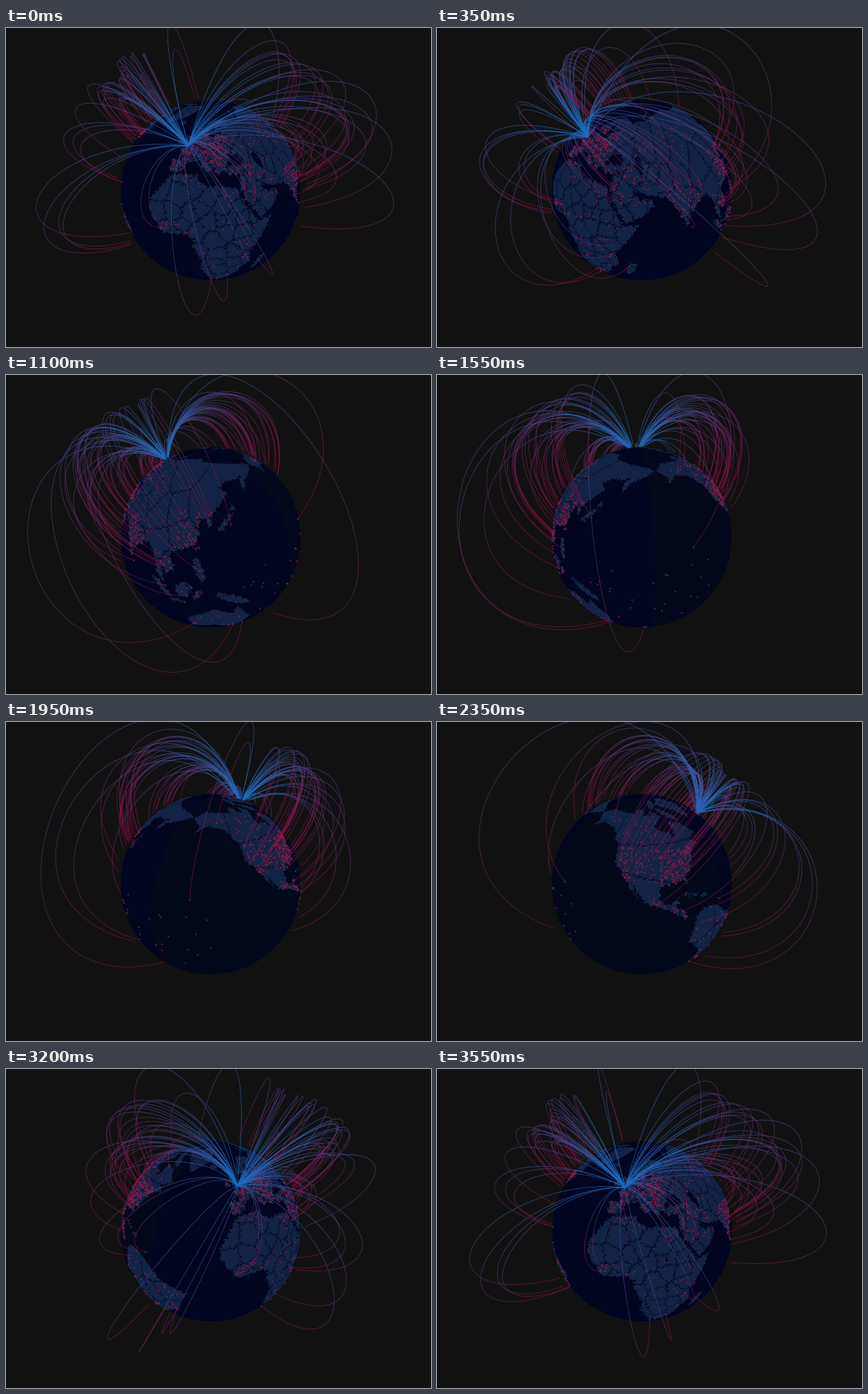
A matplotlib script for the animation above (3.6 s loop, 600 px wide and 450 px high).

```python
import numpy as np
import matplotlib.pyplot as plt
from matplotlib.animation import FuncAnimation
from matplotlib.collections import LineCollection
from matplotlib.path import Path

W, H = 600, 450
FRAMES, STEP_MS = 72, 50
CX, CY, RADIUS = 289, 229, 127
DIST = 3.7                      # camera distance in globe radii
TILT = np.radians(29.5)
START_LON = 18
FOCAL = RADIUS * np.sqrt(DIST ** 2 - 1)
HOME = (-0.3, 51.4)
CELL = 0.5                      # map resolution in degrees

BACK, DOT = "#111111", "#7d1c40"
OCEAN, OCEAN_DIM, LAND, BORDER = (2, 5, 31), (4, 8, 27), (18, 35, 69), (7, 14, 42)
ARC_A, ARC_B = np.array([24, 112, 192]) / 255, np.array([152, 12, 66]) / 255

# Coastlines as lon, lat, lon, lat ...
AFRICA = [-17, 21, -17, 15, -8, 4.5, 4, 6, 9.5, 4, 9, -1, 13.5, -11, 12, -17, 18.3, -34,
          26, -34, 33, -26, 35, -20, 40.5, -15, 39, -7, 47, 4.5, 51.3, 11.8, 43.3, 11.5,
          37, 21, 32.5, 30, 20, 32, 19, 30.3, 10.5, 34, 10.5, 37, -6, 35.8, -9.8, 31]
EUROPE = [-9, 37, -9, 43, -1.8, 43.5, -1.2, 46, -4.7, 48.4, 4, 52, 8.5, 54, 9, 57.5,
          11, 54.5, 19, 54.5, 23, 59, 30, 60, 22, 61, 22, 65.5, 17.5, 62, 15, 55.5,
          11, 59, 7, 58, 5, 61, 12, 66, 19, 69.5, 27, 71, 41, 67, 40, 65, 46, 68,
          62, 69, 62, 41, 42, 41, 38, 45.5, 39, 47, 31, 46.5, 28, 41, 24, 38, 22, 37,
          14, 45.5, 18, 40, 15.5, 38, 10, 44, 3, 43, -2, 36.8]
ASIA = [60, 69, 70, 73, 104, 77.5, 113, 74, 140, 72.5, 180, 69, 190, 66, 179, 62.5,
        163, 58, 157, 51, 156, 57, 163, 62, 155, 59.3, 142, 59, 135, 54.7, 141, 52,
        132, 43, 127.5, 39.5, 129, 35.5, 126.4, 34.5, 126, 38, 119, 39, 122, 37,
        119.5, 35, 122, 31, 118.5, 24.5, 108, 21.5, 105.8, 19, 109.2, 12, 105, 9,
        101, 13, 103.5, 2, 98.5, 8, 97, 16, 91.5, 22.5, 87, 21, 80, 15, 77.5, 8,
        73, 18, 67, 25, 57, 26.8, 48.5, 30, 51.5, 24.5, 56.3, 26, 59.8, 22.5, 55, 17.5,
        45, 12.8, 39, 21, 35, 28, 36, 36.6, 27.5, 37, 27, 40.5, 41, 41.5, 60, 42]
N_AMERICA = [-168, 66, -156, 71, -128, 70, -95, 68, -94, 72, -82, 67.5, -94, 60, -92, 57,
             -82, 55, -79, 51.5, -77, 56, -78, 62, -65, 60, -56, 52, -66, 49, -61, 46,
             -70, 43, -75.6, 35.2, -81, 31, -80, 26, -83, 29.7, -97, 28, -97.6, 22,
             -95, 18.5, -91, 18.6, -87, 21.4, -88.5, 16, -83.5, 14, -83, 10, -77.5, 8,
             -85, 10, -94, 16.2, -105, 20, -113, 31, -109.7, 23, -117, 32.5, -124.3, 40,
             -124.5, 48, -134, 58, -150, 60.5, -163, 55, -158, 59]
S_AMERICA = [-77.5, 8.5, -72, 12, -62, 10.5, -50, 0, -35, -6, -39, -13, -41, -22,
             -48.5, -26, -57, -38, -65.5, -45, -69, -54, -74, -52, -71.5, -30,
             -70.3, -18.5, -81.2, -5, -77.5, 4]
AUSTRALIA = [114, -22, 130, -12, 136, -15, 140.5, -17.5, 142.5, -10.8, 153, -25,
             150, -37.5, 140, -38, 131, -31.5, 115.5, -34.5]
GREENLAND = [-73, 78, -30, 83.5, -12, 81.5, -22, 70.5, -43.5, 60, -54, 70]

# Islands: lon, lat, half length, half width, slope in degrees.
ISLANDS = [(-2, 53.5, 4.8, 2, 110), (-8, 53, 2, 1.8, 0), (-19, 65, 4.5, 1.5, 0),
           (137, 36.5, 6.5, 1.3, 40), (143, 43.5, 2, 1.3, 0), (47, -19, 7, 2.1, 70),
           (114, 1, 5, 4, 50), (101, 0, 7.5, 1.7, 315), (110, -7.3, 4.5, .8, 350),
           (121, -1.5, 3.5, 1.5, 60), (140, -5, 10, 2.3, 335), (122, 13, 7, 2, 290),
           (175.5, -39, 3.5, 1.7, 300), (170, -44, 4, 1.2, 45), (121, 23.7, 1.6, .7, 70),
           (-79, 21.6, 5, .7, 345), (-71, 19, 2.7, .9, 0), (-72, 68, 11, 3, 330),
           (-110, 71, 7, 2.5, 0), (-82, 79, 11, 3.5, 20), (60, 74, 7, 1.2, 35)]

# Country centres that the random ones below would miss.
CENTRES = [(-100, 59), (-100, 39), (-103, 24), (-158, 64), (100, 62), (134, -25)]
COUNTRIES = [(-15, 45, 3, 30, 27), (10, 40, -33, 3, 15), (-5, 30, 38, 58, 20),
             (32, 75, 15, 47, 14), (78, 122, 14, 46, 9), (-75, -42, -35, 5, 9)]

# Airport areas: west, east, south, north, airports, flights.
AREAS = [(-9, 30, 36, 60, 190, 24), (26, 60, 22, 42, 60, 9), (-10, 12, 4, 12, 18, 2),
         (12, 45, -34, 15, 26, 1), (-8, 32, 28, 36, 14, 2), (68, 90, 8, 32, 60, 10),
         (95, 125, -8, 20, 50, 7), (105, 140, 22, 42, 80, 8), (30, 110, 45, 62, 40, 1),
         (-122, -97, 30, 50, 80, 7), (-97, -70, 27, 46, 150, 16),
         (-105, -80, 10, 24, 45, 1), (-80, -36, -34, 8, 40, 0),
         (-160, -70, 50, 65, 30, 3), (115, 153, -38, -12, 12, 0)]

# Far destinations as lon, lat.
FAR = [(18.6, -34), (28.2, -26), (37, -1), (46, -16), (-58.5, -35), (-70.8, -33.4),
       (-46.5, -23.4), (-43, -22.8), (-74, 4.7), (-67, 10.6), (-99, 19.4), (-59.5, 13),
       (-118.4, 34), (-122.4, 37.6), (-122.3, 47.4), (-158, 21.3), (175, -37),
       (151, -34), (145, -37.7), (116, -32), (140, 35.7), (126.5, 37.5), (104, 1.4),
       (101, 13.7), (80, 7.2)]


def xyz(lon, lat):
    lon, lat = np.radians(lon), np.radians(lat)
    return np.stack([np.cos(lat) * np.sin(lon), np.sin(lat), np.cos(lat) * np.cos(lon)], -1)


def view(p, lon):
    """Turn globe points so that lon faces the camera, then tilt."""
    a = np.radians(lon)
    x = p[..., 0] * np.cos(a) - p[..., 2] * np.sin(a)
    z = p[..., 0] * np.sin(a) + p[..., 2] * np.cos(a)
    y = p[..., 1]
    return np.stack([x, y * np.cos(TILT) - z * np.sin(TILT),
                     y * np.sin(TILT) + z * np.cos(TILT)], -1)


def project(q):
    s = FOCAL / (DIST - q[..., 2])
    return np.stack([CX + q[..., 0] * s, CY - q[..., 1] * s], -1)


def in_sight(q):
    """True where the globe does not cover the point."""
    cam = np.array([0, 0, DIST])
    ray = q - cam
    t = np.clip(-(ray @ cam) / (ray ** 2).sum(-1), 0, 1)
    near = cam + t[..., None] * ray
    return (near ** 2).sum(-1) > 0.998


def ellipse(lon, lat, cx, cy, a, b, slope):
    c, s = np.cos(np.radians(slope)), np.sin(np.radians(slope))
    u, v = (lon - cx) * c + (lat - cy) * s, (lat - cy) * c - (lon - cx) * s
    return (u / a) ** 2 + (v / b) ** 2 < 1


def map_grid():
    """Longitudes and latitudes of the map cells, bent a little for rough edges."""
    lon, lat = np.meshgrid(np.arange(-180, 190, CELL) + CELL / 2,
                           np.arange(-90, 90, CELL) + CELL / 2)
    return (lon + 0.5 * np.sin(1.9 * lat + lon) + 0.4 * np.sin(4.3 * lat),
            lat + 0.4 * np.sin(1.7 * lon) + 0.3 * np.sin(3.9 * lon + lat))


def land_map(lon, lat):
    points = np.stack([lon.ravel(), lat.ravel()], -1)
    land = np.zeros(lon.shape, bool)
    for ring in (AFRICA, EUROPE, ASIA, N_AMERICA, S_AMERICA, AUSTRALIA, GREENLAND):
        land |= Path(np.reshape(ring, (-1, 2))).contains_points(points).reshape(lon.shape)
    for island in ISLANDS:
        land |= ellipse(lon, lat, *island)
    land &= ~ellipse(lon, lat, 51, 42, 5, 2.2, 110)
    wrap = int(360 / CELL)
    land[:, :land.shape[1] - wrap] |= land[:, wrap:]
    return land[:, :wrap]


def border_map(lon, lat):
    """Borders run halfway between well spread country centres."""
    sites = list(CENTRES)
    for w, e, s, n, count in COUNTRIES:
        for _ in range(count):
            tries = rng.uniform((w, s), (e, n), (10, 2))
            gap = ((tries[:, None] - np.array(sites)) ** 2).sum(-1).min(1)
            sites.append(tuple(tries[gap.argmax()]))
    best, owner = np.full(lon.shape, np.inf), np.zeros(lon.shape, int)
    for k, (x, y) in enumerate(sites):
        d = (lon - x) ** 2 + (lat - y) ** 2
        owner[d < best] = k
        best = np.minimum(best, d)
    return (owner != np.roll(owner, 1, 0)) | (owner != np.roll(owner, 1, 1))


def look_up(table, lon, lat):
    rows, cols = table.shape
    return table[np.clip(((lat + 90) / CELL).astype(int), 0, rows - 1),
                 ((lon + 180) / CELL).astype(int) % cols]


def arc(end, n=56):
    """Cubic curve whose height grows with the distance flown."""
    a, b = xyz(*HOME), xyz(*end)
    ang = np.arccos(np.clip(a @ b, -1, 1))
    top = 1 + 1.55 * ang / 2

    def on_way(t):
        return (np.sin((1 - t) * ang) * a + np.sin(t * ang) * b) / np.sin(ang)

    c, d = on_way(0.25) * top, on_way(0.75) * top
    t = np.linspace(0, 1, n)[:, None]
    return (1 - t) ** 3 * a + 3 * t * (1 - t) ** 2 * c + 3 * t * t * (1 - t) * d + t ** 3 * b


rng = np.random.default_rng(7)
grid = map_grid()
land = land_map(*grid)
edges = border_map(*grid)[:, :land.shape[1]]
ground = np.where(land, np.where(edges, 2, 1), 0)

airports, ends = [], [np.array(FAR)]
for w, e, s, n, count, flights in AREAS:
    p = rng.uniform((w, s), (e, n), (count * 2, 2))
    p = p[look_up(land, p[:, 0], p[:, 1])][:count]
    airports.append(p)
    ends.append(p[:flights])
airports.append(rng.uniform((145, -22), (215, 14), (24, 2)))
ends = np.concatenate(ends)
airports = np.concatenate(airports + [ends])
dots = xyz(airports[:, 0], airports[:, 1])

arcs = np.stack([arc(e) for e in ends])
mix = np.linspace(0, 1, arcs.shape[1] - 1)[:, None]
ramp = np.hstack([ARC_A * (1 - mix) + ARC_B * mix, 0.62 - 0.08 * mix])
arc_rgba = np.tile(ramp, (len(arcs), 1, 1))

# Globe coordinates under every pixel, for the view facing longitude 0.
px, py = np.meshgrid((np.arange(W) + 0.5 - CX) / FOCAL, (CY - np.arange(H) - 0.5) / FOCAL)
norm = px ** 2 + py ** 2 + 1
disc = DIST ** 2 - norm * (DIST ** 2 - 1)
inside = disc > 0
t = (DIST - np.sqrt(disc[inside])) / norm[inside]
gx, gy, gz = t * px[inside], t * py[inside], DIST - t
pix_lat = np.degrees(np.arcsin(np.clip(gy * np.cos(TILT) + gz * np.sin(TILT), -1, 1)))
pix_lon = np.degrees(np.arctan2(gx, gz * np.cos(TILT) - gy * np.sin(TILT)))


def globe(lon0):
    lon = (pix_lon + lon0 + 180) % 360 - 180
    kind = look_up(ground, lon, pix_lat)
    rgb = np.array([OCEAN, LAND, BORDER])[kind]
    rgb[(kind == 0) & (lon < -55)] = OCEAN_DIM
    img = np.full((H, W, 3), 17, np.uint8)
    img[inside] = rgb
    return img


fig = plt.figure(figsize=(W / 100, H / 100), dpi=100, facecolor=BACK)
ax = fig.add_axes([0, 0, 1, 1])
ax.axis("off")
picture = ax.imshow(globe(START_LON), extent=(0, W, H, 0), interpolation="nearest", aspect="auto")
dot_marks, = ax.plot([], [], "o", color=DOT, ms=1.55, mew=0, zorder=3)
arc_lines = LineCollection([], linewidths=0.72, capstyle="butt", zorder=4)
ax.add_collection(arc_lines)
ax.set_xlim(0, W)
ax.set_ylim(H, 0)


def update(i):
    lon0 = START_LON + 360 * i / FRAMES
    picture.set_data(globe(lon0))

    q = view(dots, lon0)
    xy = project(q[q[:, 2] > 1 / DIST])
    dot_marks.set_data(xy[:, 0], xy[:, 1])

    q = view(arcs, lon0)
    xy, seen = project(q), in_sight(q)
    keep = seen[:, :-1] & seen[:, 1:]
    arc_lines.set_segments(np.stack([xy[:, :-1], xy[:, 1:]], 2)[keep])
    arc_lines.set_color(arc_rgba[keep])
    return picture, dot_marks, arc_lines


anim = FuncAnimation(fig, update, frames=FRAMES, interval=STEP_MS, repeat=True)
plt.show()
```
